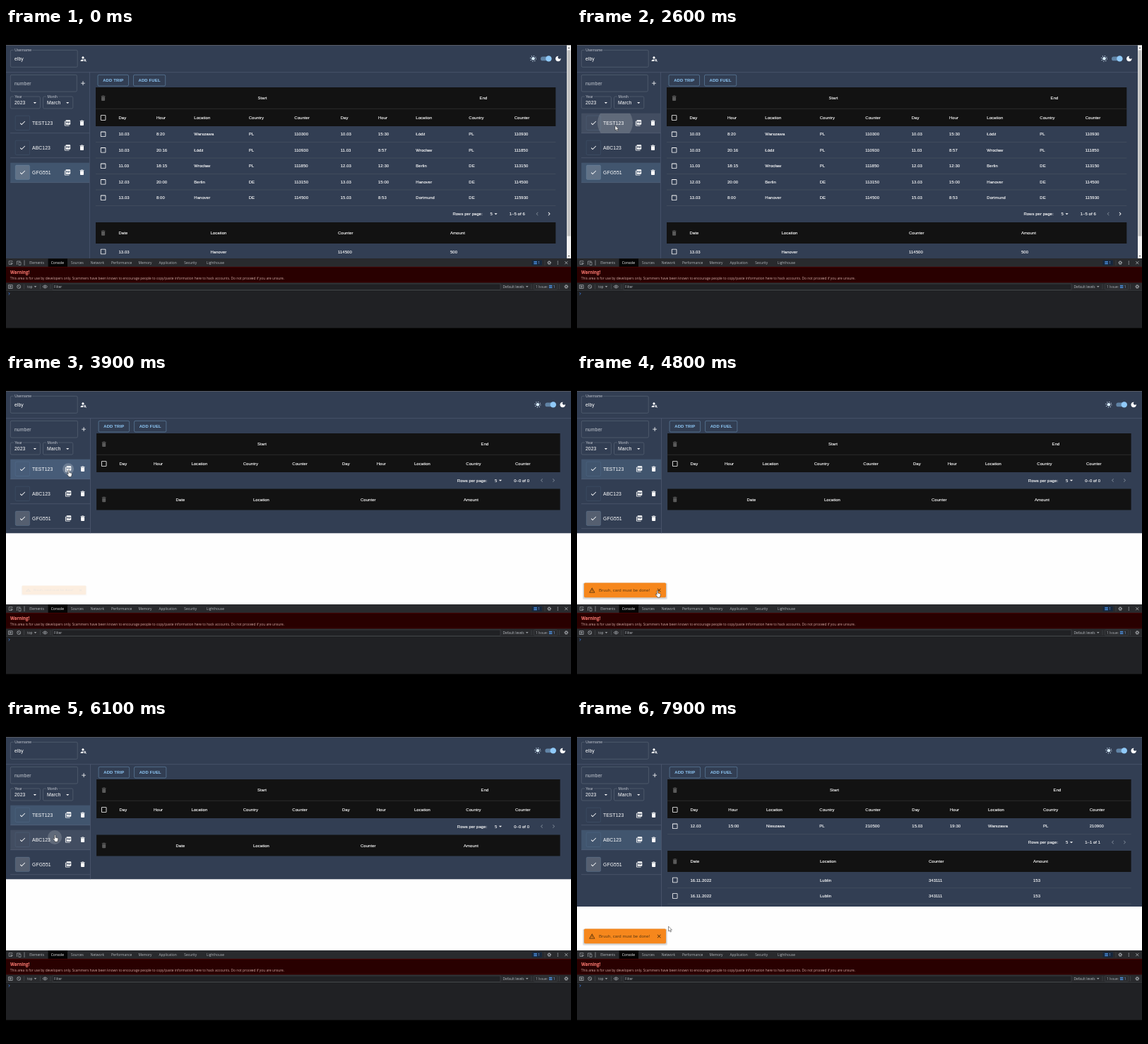
Animation, 800 px wide and 450 px high, one loop 8 s. Source, as an HTML page:

```html
<!DOCTYPE html>
<html lang="en">
<head>
<meta charset="utf-8">
<title>Trip cards</title>
<style>
html, body { margin: 0; width: 100%; height: 100%; overflow: hidden; background: #000; }
svg { display: block; width: 100vw; height: 100vh; }
text { font-family: "Liberation Sans", Arial, sans-serif; fill: #fff; white-space: pre; }
.cell { font-size: 5.95px; letter-spacing: .0107em; stroke: #fff; stroke-width: .12px; }
.body { font-size: 6.85px; letter-spacing: .0094em; }
.label { font-size: 5.1px; letter-spacing: .0094em; fill: #c3c8d0; }
.btn { font-size: 5.9px; font-weight: 700; letter-spacing: .0286em; fill: #90caf9; }
.toast { font-size: 6px; letter-spacing: .0107em; fill: #5e3a12; }
.dev { font-family: "Open Sans", "Noto Sans", sans-serif; font-size: 4.84px; fill: #b4b8bd; }
.warn { font-family: "Open Sans", "Noto Sans", sans-serif; font-size: 6.1px; font-weight: 700; fill: #ff7b72; }
</style>
</head>
<body>
<script>
const NS = "http://www.w3.org/2000/svg";
const PAGE = "#323e53", HEAD = "#121212", EDGE = "#5f6a7b", LINE = "#4b5564", U = 10 / 24;

const ICON = {
  check: "M9 16.17 4.83 12l-1.42 1.41L9 19 21 7l-1.41-1.41z",
  pdf: "M20 2H8c-1.1 0-2 .9-2 2v12c0 1.1.9 2 2 2h12c1.1 0 2-.9 2-2V4c0-1.1-.9-2-2-2zm-8.5 7.5c0 .83-.67 1.5-1.5 1.5H9v2H7.5V7H10c.83 0 1.5.67 1.5 1.5v1zm5 2c0 .83-.67 1.5-1.5 1.5h-2.5V7H15c.83 0 1.5.67 1.5 1.5v3zm4-3H19v1h1.5V11H19v2h-1.5V7h3v1.5zM9 9.5h1v-1H9v1zM4 6H2v14c0 1.1.9 2 2 2h14v-2H4V6zm10 5.5h1v-3h-1v3z",
  bin: "M6 19c0 1.1.9 2 2 2h8c1.1 0 2-.9 2-2V7H6v12zM19 4h-3.5l-1-1h-5l-1 1H5v2h14V4z",
  plus: "M19 13h-6v6h-2v-6H5v-2h6V5h2v6h6v2z",
  person: "M10 4a4 4 0 1 0 .01 0zM10.35 14.01C7.62 13.91 2 15.27 2 18v2h9.54c-2.47-2.76-1.23-5.89-1.19-5.99zM19.43 18.02C19.79 17.43 20 16.74 20 16c0-2.21-1.79-4-4-4s-4 1.79-4 4 1.79 4 4 4c.74 0 1.43-.22 2.02-.57L20.59 22 22 20.59l-2.57-2.57zM16 18c-1.1 0-2-.9-2-2s.9-2 2-2 2 .9 2 2-.9 2-2 2z",
  box: "M19 5v14H5V5h14m0-2H5c-1.1 0-2 .9-2 2v14c0 1.1.9 2 2 2h14c1.1 0 2-.9 2-2V5c0-1.1-.9-2-2-2z",
  moon: "M12 3c-4.97 0-9 4.03-9 9s4.03 9 9 9 9-4.03 9-9c0-.46-.04-.92-.1-1.36-.98 1.37-2.58 2.26-4.4 2.26-2.98 0-5.4-2.42-5.4-5.4 0-1.81.89-3.42 2.26-4.4-.44-.06-.9-.1-1.36-.1z",
  down: "M7 10l5 5 5-5z",
  left: "M15.41 7.41 14 6l-6 6 6 6 1.41-1.41L10.83 12z",
  right: "M10 6 8.59 7.41 13.17 12l-4.58 4.59L10 18l6-6z",
  alert: "M12 5.99L19.53 19H4.47L12 5.99M12 2L1 21h22L12 2zm1 14h-2v2h2v-2zm0-6h-2v4h2v-4z",
  close: "M19 6.41 17.59 5 12 10.59 6.41 5 5 6.41 10.59 12 5 17.59 6.41 19 12 13.41 17.59 19 19 17.59 13.41 12z"
};

function el(tag, attrs, parent, str) {
  const e = document.createElementNS(NS, tag);
  set(e, attrs);
  if (str) e.textContent = str;
  parent.appendChild(e);
  return e;
}
function set(e, attrs) { for (const k in attrs) e.setAttribute(k, attrs[k]); }
const group = parent => el("g", {}, parent);
const rect = (g, x, y, x2, y2, fill, more) =>
  el("rect", { x, y, width: x2 - x, height: y2 - y, fill, ...more }, g);
const text = (g, cls, x, y, str, more) => el("text", { class: cls, x, y, ...more }, g, str);
const path = (g, d, stroke, more) =>
  el("path", { d, fill: "none", stroke, "stroke-width": .6, ...more }, g);
const icon = (g, name, x, y, fill = "#fff", s = U) =>
  el("path", { d: ICON[name], fill, transform: `translate(${x - 12 * s} ${y - 12 * s}) scale(${s})` }, g);
const hline = (g, x, x2, y, color = LINE) => path(g, `M${x} ${y}H${x2}`, color);

const svg = el("svg", { viewBox: "0 0 800 450", preserveAspectRatio: "none" }, document.body);
rect(svg, 0, 0, 800, 450, "#000");
const clip = el("clipPath", { id: "view" }, el("defs", {}, svg));
rect(clip, 0, 24.5, 800, 326, "#fff");
const page = el("g", { "clip-path": "url(#view)" }, svg);

const CARDS = ["TEST123", "ABC123", "GFG551"];
const cardY = i => 134.3 + 35 * i;
const TRIP = ["Day", "Hour", "Location", "Country", "Counter"];
const FUEL = ["Date", "Location", "Counter", "Amount"];

const SCENES = [
  { end: 326, bar: true, range: "1–5 of 6", start: 363, stop: 676,
    cols: [159.5, 213, 266.3, 343.7, 408.3, 473.7, 527, 580.3, 655.3, 719.7],
    trips: ["10.03 8:20 Warszawa PL 110300 10.03 15:30 Łódź PL 110930",
      "10.03 20:16 Łódź PL 110930 11.03 8:57 Wrocław PL 111850",
      "11.03 18:15 Wrocław PL 111850 12.03 12:30 Berlin DE 113150",
      "12.03 20:00 Berlin DE 113150 13.03 15:00 Hanover DE 114500",
      "13.03 8:00 Hanover DE 114500 15.03 8:53 Dortmund DE 115930"],
    fuelCols: [159.5, 289.5, 470, 629], fuel: ["13.03 Hanover 114500 500"] },
  { end: 225.3, range: "0–0 of 0", start: 362.5, stop: 678,
    cols: [160.5, 209, 262.4, 335.7, 405.3, 476, 524.7, 578, 651.3, 721],
    trips: [], fuelCols: [240.5, 350, 502, 648], fuel: [] },
  { end: 264, range: "1–1 of 1", start: 364.5, stop: 680,
    cols: [160.5, 214.3, 268, 343.3, 408.3, 474.3, 528, 582, 660, 725.7],
    trips: ["12.03 15:00 Nieszawa PL 210500 15.03 19:30 Warszawa PL 210900"],
    fuelCols: [160.5, 344, 498, 646],
    fuel: ["16.11.2022 Lublin 343111 153", "16.11.2022 Lublin 343111 153"] }
];

function field(g, x, y, x2, y2, label, w) {
  rect(g, x, y, x2, y2, "none", { rx: 1.7, stroke: EDGE, "stroke-width": .6 });
  if (!label) return;
  rect(g, x + 4.5, y - 1, x + 6.5 + w, y + 1, PAGE);
  text(g, "label", x + 6, y + 1.8, label);
}

function cells(g, xs, y, words) {
  words.forEach((w, i) => text(g, "cell", xs[i], y + 2.1, w));
}

function drawBack(s, g) {
  const right = s.bar ? 794 : 800, side = s.bar ? 118.4 : 119.5;
  rect(g, 0, 24, 800, 326, "#fefefe");
  rect(g, 0, 24, right, s.end, PAGE);
  hline(g, 0, right, 62.7, "#56617a");
  path(g, `M${side} 62.7V${s.end}`, "#56617a");
  CARDS.forEach((c, i) => hline(g, 6, side, cardY(i) + 14.4, "#566176"));
}

function drawSide(s, g) {
  const d = s.bar ? 0 : 1.1;
  field(g, 6.3, 31.3, 101.2, 55.3, "Username", 24);
  text(g, "body", 12, 46, "elby");
  icon(g, "person", 109.8, 43.7);
  field(g, 6.3, 66.3, 100.3 + d, 90);
  text(g, "body", 12, 80.5, "number", { fill: "#c3c8d0", style: "fill:#c3c8d0" });
  icon(g, "plus", 109 + d, 78.2);
  field(g, 6.3, 97, 48.4, 114, "Year", 11);
  text(g, "body", 12, 108.3, "2023");
  icon(g, "down", 40.9, 105.8);
  field(g, 52.5, 97, 94.8, 114, "Month", 15);
  text(g, "body", 58, 108.3, "March");
  icon(g, "down", 87.2, 105.8);
  CARDS.forEach((c, i) => {
    const y = cardY(i), done = i === 2;
    rect(g, 13.2, y - 10.2, 33.6, y + 10.2, done ? "#fff" : "none", {
      rx: 1.7, "fill-opacity": .17, stroke: "#90caf9", "stroke-opacity": done ? .3 : .17, "stroke-width": .5 });
    icon(g, "check", 23.4, y);
    text(g, "body", 37, y + 2.3, c);
    icon(g, "pdf", 87 + d, y);
    icon(g, "bin", 107.5 + d, y);
  });
}

function drawTop(s, g) {
  const x = s.bar ? 0 : 6.4;
  el("circle", { cx: 746.5 + x, cy: 43.3, r: 2.3, fill: "#d8ecff" }, g);
  el("circle", { cx: 746.5 + x, cy: 43.3, r: 3.9, fill: "none", stroke: "#d8ecff",
    "stroke-width": 1.1, "stroke-dasharray": "1 2.06" }, g);
  rect(g, 757 + x, 40.5, 771.5 + x, 46.3, "#90caf9", { rx: 2.9, "fill-opacity": .5 });
  el("circle", { cx: 768.4 + x, cy: 43.4, r: 4.2, fill: "#90caf9" }, g);
  icon(g, "moon", 781.8 + x, 43.4);
}

function drawMain(s, g) {
  const d = s.bar ? 0 : 1.1, x = 127 + d, x2 = s.bar ? 778.3 : 784.6, f = s.bar ? 0 : 6.4, tick = 137.6 + d;
  [["ADD TRIP", 130, 173.5], ["ADD FUEL", 180.5, 225.7]].forEach(([label, a, b]) => {
    rect(g, a + d, 66.3, b + d, 82, "none", { rx: 1.7, stroke: "#90caf9", "stroke-opacity": .55, "stroke-width": .6 });
    text(g, "btn", (a + b) / 2 + d, 76.3, label, { "text-anchor": "middle" });
  });
  rect(g, x, 84, x2, 139, HEAD);
  hline(g, x, x2, 114.3, "#3c3c3c");
  icon(g, "bin", tick, 99.3, "#5a5a5a");
  text(g, "cell", s.start, 101.2, "Start", { "text-anchor": "middle" });
  text(g, "cell", s.stop, 101.2, "End", { "text-anchor": "middle" });
  icon(g, "box", tick, 127);
  cells(g, s.cols, 127, [...TRIP, ...TRIP]);
  let y = 139;
  s.trips.forEach(row => {
    icon(g, "box", tick, y + 11.3);
    cells(g, s.cols, y + 11.3, row.split(" "));
    y += 22.5;
    hline(g, x, x2, y);
  });
  const m = y + 11.6;
  text(g, "cell", 632.4 + f, m + 2.1, "Rows per page:");
  text(g, "cell", 685.5 + f, m + 2.1, "5");
  icon(g, "down", 693.6 + f, m);
  text(g, "cell", 712.8 + f, m + 2.1, s.range);
  icon(g, "left", 752.2 + f, m, "#75808f");
  icon(g, "right", 769 + f, m, s.bar ? "#fff" : "#75808f");
  y += 23.5;
  rect(g, x, y, x2, y + 30, HEAD);
  icon(g, "bin", tick, y + 15, "#5a5a5a");
  cells(g, s.fuelCols, y + 15, FUEL);
  y += 30.2;
  s.fuel.forEach(row => {
    icon(g, "box", tick, y + 11.3);
    cells(g, s.fuelCols, y + 11.3, row.split(" "));
    y += 22.5;
    hline(g, x, x2, y);
  });
}

function drawBar(g) {
  rect(g, 794, 24, 800, 326, "#f1f1f1");
  rect(g, 794.6, 31.5, 799.4, 294.5, "#c1c1c1");
  path(g, "M795.6 29l1.4-1.8 1.4 1.8zM795.6 322l1.4 1.8 1.4-1.8z", "none", { fill: "#505050" });
}

// Page layers: backgrounds, card highlights, contents, toast
const backs = SCENES.map(s => { const g = group(page); drawBack(s, g); return g; });
const rows = CARDS.map((c, i) => rect(page, 6.2, cardY(i) - 13.6, 118, cardY(i) + 14.4, "#fff"));
const rowClips = CARDS.map((c, i) => {
  const cp = el("clipPath", { id: "row" + i }, svg.firstElementChild.parentNode.querySelector("defs"));
  rect(cp, 6.2, cardY(i) - 13.6, 118.6, cardY(i) + 14.4, "#fff");
  return `url(#row${i})`;
});
const halo = el("circle", { r: 8, fill: "#fff", "fill-opacity": .1 }, page);
const ripple = el("circle", { fill: "#fff" }, el("g", {}, page));
const fronts = SCENES.map(s => {
  const g = group(page);
  drawSide(s, g); drawTop(s, g); drawMain(s, g);
  if (s.bar) drawBar(g);
  return g;
});

const toast = group(page);
for (let i = 3; i > 0; i--)
  rect(toast, 10 - i * .7, 296 - i * .2, 126 + i * .7, 316.2 + i, "#000", { rx: 2, "fill-opacity": .07 });
rect(toast, 10, 295.6, 126, 316.2, "#f6871c", { rx: 1.7 });
icon(toast, "alert", 21.3, 306, "#4a2c0a", .38);
text(toast, "toast", 31, 308, "Bruuh, card must be done!");
icon(toast, "close", 116.2, 306.1, "#4a2c0a", .36);

function gear(g, x, y) {
  el("circle", { cx: x, cy: y, r: 1.6, fill: "none", stroke: "#b4b8bd", "stroke-width": 1 }, g);
  el("circle", { cx: x, cy: y, r: 2.5, fill: "none", stroke: "#b4b8bd", "stroke-width": .8, "stroke-dasharray": "1 .96" }, g);
}
function badge(g, x, y) {
  path(g, `M${x} ${y - 1.6}h4.6M${x} ${y}h4.6M${x} ${y + 1.6}h4.6`, "#4f95e8", { "stroke-width": 1 });
  text(g, "dev", x + 6, y + 1.7, "1", { style: "fill:#8ab4f8" });
}

function drawTools(g) {
  const grey = "#b4b8bd";
  rect(g, 0, 326, 800, 338, "#292a2d");
  rect(g, 59.6, 326.4, 87, 338, "#050505");
  path(g, "M8 334.5H4.2V329.8H9V331M6.6 332l3 1.1-1.3.5-.5 1.3zM15.5 335v-5h5M18 331.4h3v4h-3zM26 328.5v7.5", grey);
  [["Elements", 33.3], ["Console", 63.8], ["Sources", 92], ["Network", 119.8], ["Performance", 149],
    ["Memory", 187.6], ["Application", 216.5], ["Security", 252.3], ["Lighthouse", 284]]
    .forEach(([s, x], i) => text(g, "dev", x, 334.1, s, i === 1 ? { style: "fill:#fff" } : {}));
  rect(g, 744.5, 328.6, 759, 335.8, "#16273d", { rx: 1 });
  badge(g, 747.3, 332.2);
  path(g, "M763 328.5v7.5", "#494c50");
  gear(g, 769.2, 332.2);
  [-2, 0, 2].forEach(d => el("circle", { cx: 781.3, cy: 332.2 + d, r: .6, fill: grey }, g));
  path(g, "M791.3 330.2l4 4M795.3 330.2l-4 4", grey, { "stroke-width": .8 });
  rect(g, 0, 338, 800, 360.4, "#290000");
  hline(g, 0, 800, 338.3, "#5c0000");
  hline(g, 0, 800, 360, "#5c0000");
  text(g, "warn", 6, 348.2, "Warning!");
  text(g, "dev", 5.8, 355.7, "This area is for use by developers only. Scammers have been known to encourage people to copy/paste information here to hack accounts. Do not proceed if you are unsure.", { style: "fill:#cfa6a0" });
  rect(g, 0, 360.4, 800, 372, "#292a2d");
  hline(g, 0, 800, 371.9, "#45484c");
  path(g, "M3.5 363.7h5.6v4.8H3.5zM5.6 364.8l2 1.3-2 1.3zM20.7 366a2.5 2.5 0 1 1-5 0a2.5 2.5 0 1 1 5 0M16.5 364.3l3.5 3.5M52 366q3.3-4 6.6 0q-3.3 4-6.6 0zM54.4 366a.9.9 0 1 0 1.8 0a.9.9 0 1 0-1.8 0", grey, { "stroke-width": .7 });
  path(g, "M25.5 362.5v7M48.5 362.5v7M63 362.5v7M744 362.5v7M783.5 362.5v7", "#494c50");
  text(g, "dev", 30, 367.8, "top");
  icon(g, "down", 41.5, 366, grey, .36);
  rect(g, 66, 362, 700, 370.4, "#202124", { stroke: "#4a4d51", "stroke-width": .5 });
  text(g, "dev", 68, 367.8, "Filter");
  text(g, "dev", 703.5, 367.8, "Default levels");
  icon(g, "down", 737.8, 366, grey, .36);
  rect(g, 747.5, 362, 780.5, 370, "none", { rx: 1, stroke: "#45484c", "stroke-width": .5 });
  text(g, "dev", 750, 367.8, "1 Issue:");
  badge(g, 768.8, 366);
  gear(g, 793.3, 366);
  rect(g, 0, 372.2, 800, 424.6, "#202124");
  path(g, "M3.7 374.4l1.6 1.6-1.6 1.6", "#3f86f0", { "stroke-width": .8 });
}
drawTools(group(svg));

const edge = { fill: "#fff", "stroke-linejoin": "round", "stroke-width": .5 };
const arrow = path(svg, "M0 0v7l1.6-1.5 1.1 2.5 1.2-.5-1.1-2.4h2.2z", "#222", edge);
const hand = path(svg, "M-.9.6a.8.8 0 0 1 1.6 0v3l3 .7q.8.2.7 1.1l-.5 2.6-.6 1.6h-3.4l-.8-1.6-2-2.6q.2-1 1.2-.5l.8.9z", "#111", edge);

// Pointer track: time, x, y
const TRACK = [[900, 98, 398], [1200, 88, 232], [1500, 87, 231], [2200, 55, 139], [2600, 54, 138],
  [2700, 56, 138], [3100, 85.5, 145], [3300, 89, 136], [4200, 89, 136], [4800, 114, 306.5],
  [5400, 115, 306], [6000, 69, 162.5], [6200, 70, 163], [6700, 90, 170.5], [7500, 90, 170.5], [7900, 129.5, 292]];
// Clicks: start, x, y, largest radius, card
const CLICKS = [[2500, 54, 134.3, 72, 0], [3600, 88.1, 134.3, 8, 0], [6100, 69, 166, 72, 1], [7400, 88.1, 169.3, 8, 1]];

const clamp = v => Math.max(0, Math.min(1, v));
const smooth = k => k * k * (3 - 2 * k);
const show = (e, on) => e.setAttribute("visibility", on ? "visible" : "hidden");

function pointer(t) {
  let i = 0;
  while (i < TRACK.length - 2 && t >= TRACK[i + 1][0]) i++;
  const [t0, x0, y0] = TRACK[i], [t1, x1, y1] = TRACK[i + 1], k = smooth(clamp((t - t0) / (t1 - t0)));
  return [x0 + (x1 - x0) * k, y0 + (y1 - y0) * k];
}

function draw(t) {
  const scene = t < 2800 ? 0 : t < 6400 ? 1 : 2;
  const chosen = t < 2700 ? 2 : t < 6300 ? 0 : 1;
  const seen = t >= 900, [x, y] = pointer(t);
  backs.forEach((g, i) => show(g, i === scene));
  fronts.forEach((g, i) => show(g, i === scene));

  let over = -1;
  rows.forEach((r, i) => {
    const hit = seen && x > 6 && x < 119 && Math.abs(y - cardY(i)) < 14;
    if (hit) over = i;
    const on = i === chosen;
    set(r, { width: scene ? 112.9 : 111.8, fill: on ? "#90caf9" : "#fff",
      "fill-opacity": on ? (hit ? .22 : .16) : hit ? .08 : 0 });
  });

  const px = scene ? 88.1 : 87;
  show(halo, over >= 0 && Math.hypot(x - px, y - cardY(over)) < 8);
  if (over >= 0) set(halo, { cx: px, cy: cardY(over) });

  const click = CLICKS.find(c => t >= c[0] && t < c[0] + 500);
  show(ripple, click);
  if (click) {
    const dt = t - click[0];
    ripple.parentNode.setAttribute("clip-path", rowClips[click[4]]);
    set(ripple, { cx: click[1], cy: click[2], r: Math.min(click[3], 10 + dt * .15),
      "fill-opacity": .16 * (1 - clamp((dt - 200) / 300)) });
  }

  const k = t < 7000
    ? smooth(clamp((t - 3850) / 225)) * (1 - smooth(clamp((t - 5300) / 200)))
    : smooth(clamp((t - 7550) / 225));
  set(toast, { opacity: k,
    transform: `translate(68 306) scale(${.75 + .25 * k} ${.56 + .44 * k}) translate(-68 -306)` });

  const grab = t > 2600 && (over >= 0 || (k > .3 && Math.hypot(x - 116, y - 306) < 7));
  show(arrow, seen && !grab);
  show(hand, seen && grab);
  [arrow, hand].forEach(c => c.setAttribute("transform", `translate(${x} ${y})`));
}

const begin = performance.now();
function tick() {
  const t = (performance.now() - begin) % 8000;
  draw(Math.floor(t / 100) * 100);
  requestAnimationFrame(tick);
}
tick();
</script>
</body>
</html>
```
